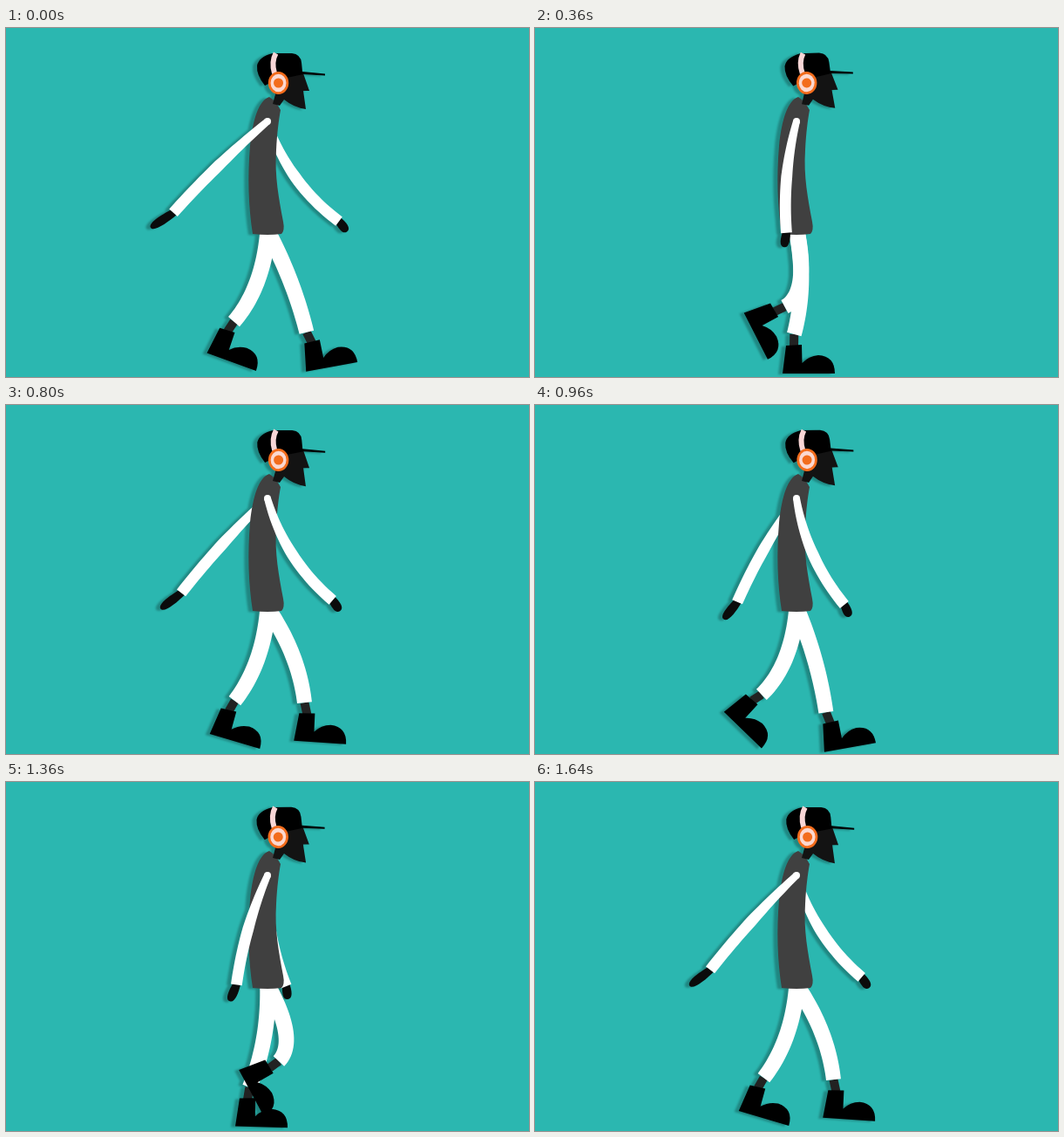
An HTML page with a canvas that plays this animation: 600x400 px, repeating every 1.68 s.

```html
<!DOCTYPE html>
<html lang="en">
<head>
<meta charset="utf-8">
<title>Walk cycle</title>
<style>
  html, body { margin: 0; height: 100%; overflow: hidden; background: #2bb7b0; }
  canvas { display: block; filter: drop-shadow(-5px 1px 0.8px rgba(0, 0, 0, .26)); }
</style>
</head>
<body>
<canvas id="stage" width="600" height="400"></canvas>
<script>
const ctx = document.getElementById('stage').getContext('2d');
const LOOP = 1680, HALF = LOOP / 2, STEP = 40;
const SHOULDER = [300, 107], HIP = [300.5, 234];
const LEG_LENGTH = 126, SHIN = 12;

// Key poses of one foot; everything above the ankle follows from them
const POSES = [
  { at: 0, x: 351, y: 359, tilt: -10.5 },    // heel strike
  { at: 120, x: 339, y: 363, tilt: -10 },    // weight on
  { at: 360, x: 297, y: 363, tilt: 0 },      // passing
  { at: 640, x: 262, y: 361, tilt: 3 },      // push
  { at: 840, x: 254, y: 346, tilt: 20 },     // heel up
  { at: 960, x: 249, y: 337, tilt: 44 },     // toe off
  { at: 1200, x: 275, y: 323, tilt: 63 },    // fold
  { at: 1480, x: 323, y: 328, tilt: 61 }     // reach
];

const TORSO = new Path2D('M302 79C290 83 283 105 280 135C277 170 278 205 283 236Q300 238 316 236Q320 232 318 222C313 195 308 170 310 140C311 120 313 105 315 94Q310 84 302 79Z');
const CAP = new Path2D('M288 43Q290 33 306 29L328 29Q338 30 339 40L340 50L366 52.5L366 54.5L341 53L322 57L303 63L297 66Q287 54 288 43Z');
const FACE = new Path2D('M303 59L341 52L348 72L341 72L344 93Q330 91 319 82L314 89L306 87L309 76Z');
const BAND = new Path2D('M309.5 29Q304 39 308 52');
const BOOT = new Path2D('M-9 1L9 0L9.5 21Q17 13 28 12Q47 13 47 33L-13 33Z');

const rad = degrees => degrees * Math.PI / 180;

function placed(x, y, angle, draw) {
  ctx.save();
  ctx.translate(x, y);
  ctx.rotate(angle);
  draw();
  ctx.restore();
}

function fill(path, color) {
  ctx.fillStyle = color;
  ctx.fill(path);
}

function disc(x, y, rx, ry, color) {
  const path = new Path2D();
  path.ellipse(x, y, rx, ry, 0, 0, 7);
  fill(path, color);
}

// Point beside the middle of a-b: "side" across the line, "along" down it
function joint([ax, ay], [bx, by], side, along = 0) {
  const d = Math.hypot(bx - ax, by - ay), ux = (bx - ax) / d, uy = (by - ay) / d;
  return [(ax + bx) / 2 + uy * side + ux * along, (ay + by) / 2 - ux * side + uy * along];
}

// White tube along a quadratic curve, width given by a function of progress
function tube([x0, y0], [cx, cy], [x1, y1], width) {
  const left = [], right = [];
  for (let i = 0; i <= 24; i++) {
    const s = i / 24, r = 1 - s;
    const x = r * r * x0 + 2 * r * s * cx + s * s * x1;
    const y = r * r * y0 + 2 * r * s * cy + s * s * y1;
    const dx = r * (cx - x0) + s * (x1 - cx), dy = r * (cy - y0) + s * (y1 - cy);
    const k = width(s) / 2 / Math.hypot(dx, dy);
    left.push([x - dy * k, y + dx * k]);
    right.unshift([x + dy * k, y - dx * k]);
  }
  ctx.fillStyle = '#fff';
  ctx.beginPath();
  for (const p of [...left, ...right]) ctx.lineTo(...p);
  ctx.fill();
}

// Forward swing starts fast, backward swing is even
function arm(t) {
  const swing = t < HALF ? (t / HALF) ** .8 : 2 - t / HALF;
  const reach = -108 + 190 * swing;
  const cuff = [SHOULDER[0] + reach, 235 - .002 * reach * reach];
  const elbow = joint(SHOULDER, cuff, -12 * Math.exp(reach / 130));
  const hand = 15 + .15 * Math.max(0, -reach);

  placed(...cuff, Math.atan2(cuff[1] - elbow[1], cuff[0] - elbow[0]) + .25, () => {
    ctx.fillStyle = '#0b0b0b';
    ctx.beginPath();
    ctx.moveTo(-3, -4);
    ctx.bezierCurveTo(hand * .4, -6, hand, -6, hand, 0);
    ctx.bezierCurveTo(hand, 6, hand * .5, 6, -3, 4);
    ctx.fill();
  });
  disc(...SHOULDER, 4, 4, '#fff');
  tube(SHOULDER, elbow, cuff, s => 8 + 4.8 * Math.min(1, s * 2));
}

function footAt(t) {
  const i = POSES.findLastIndex(pose => pose.at <= t);
  const a = POSES[i], b = POSES[i + 1] || { ...POSES[0], at: LOOP };
  const s = (t - a.at) / (b.at - a.at);
  return ['x', 'y', 'tilt'].map(key => a[key] + (b[key] - a[key]) * s);
}

function leg(t) {
  const [x, y, tilt] = footAt(t);
  const lean = rad(tilt + .4 * (HIP[0] - x));
  const cuff = [x + SHIN * Math.sin(lean), y - SHIN * Math.cos(lean)];
  const stretch = Math.hypot(cuff[0] - HIP[0], cuff[1] - HIP[1]) / LEG_LENGTH;
  const bend = 35 * Math.sqrt(Math.max(0, 1 - stretch * stretch));
  const knee = joint(HIP, cuff, bend, bend ** 3 / 700);

  ctx.strokeStyle = '#222';
  ctx.lineWidth = 10;
  ctx.beginPath();
  ctx.moveTo(...cuff);
  ctx.lineTo(x, y + 2);
  ctx.stroke();
  tube(HIP, knee, cuff, s => 18.5 - 1.5 * s);
  placed(x, y, rad(tilt), () => fill(BOOT, '#000'));
}

function head(t) {
  const nod = -.8 + 1.4 * Math.cos((t - 720) / HALF * 2 * Math.PI);
  placed(310, 85, rad(nod), () => {
    ctx.translate(-310, -85);
    fill(FACE, '#131313');
    fill(CAP, '#000');
    ctx.strokeStyle = '#f8d6d6';
    ctx.lineWidth = 6;
    ctx.stroke(BAND);
    disc(312.5, 63, 11.7, 13, '#f36c1c');
    disc(312.5, 63, 9, 10.3, '#fbd8d0');
    disc(312.5, 63, 5.5, 5.5, '#f36c1c');
  });
}

function frame(now) {
  const t = Math.floor(now / STEP) * STEP % LOOP;
  const opposite = (t + HALF) % LOOP;
  ctx.clearRect(0, 0, 600, 400);
  arm(opposite);
  leg(opposite);
  leg(t);
  fill(TORSO, '#404040');
  head(t);
  arm(t);
}

function tick() {
  frame(performance.now());
  requestAnimationFrame(tick);
}
tick();
</script>
</body>
</html>
```
